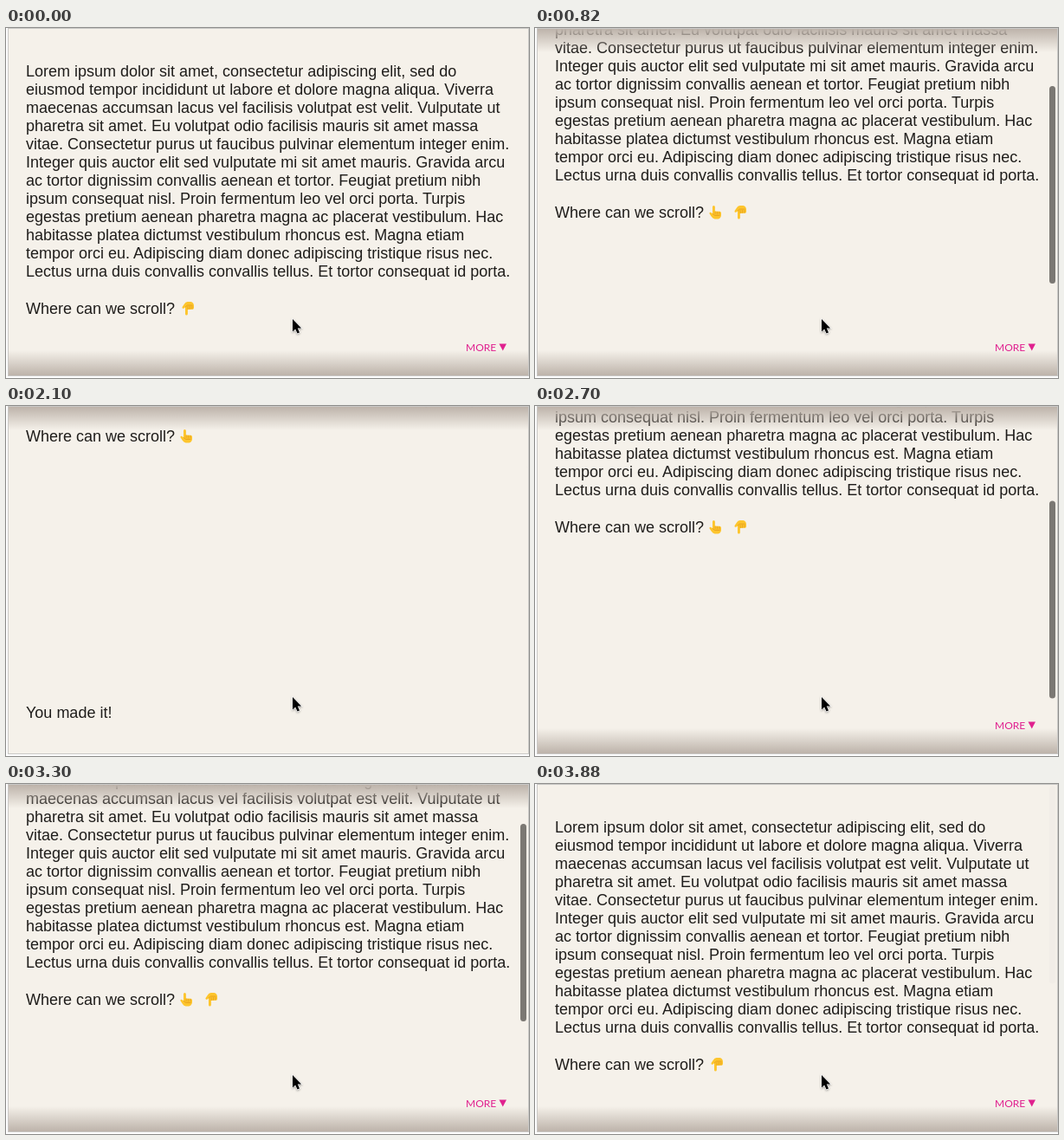
An HTML page that plays this animation: 604x404 px, repeating every 4400 ms.

```html
<!DOCTYPE html>
<html lang="en">
<head>
<meta charset="utf-8">
<title>Scroll hints</title>
<style>
html, body { margin: 0; width: 100%; height: 100%; overflow: hidden; background: #fff; }
svg { display: block; }
#content { font: 18px "Liberation Sans", Arial, sans-serif; fill: #1f1d1b; }
#more { font: 12px Lato, sans-serif; fill: #e0218f; }
</style>
</head>
<body>
<svg width="604" height="404" viewBox="0 0 604 404">
  <defs>
    <clipPath id="inner"><rect x="3" y="1" width="600" height="400"/></clipPath>
    <linearGradient id="fade" x1="0" y1="0" x2="0" y2="1">
      <stop offset="0" stop-color="#bdb3aa"/>
      <stop offset="1" stop-color="#bdb3aa" stop-opacity="0"/>
    </linearGradient>
    <g id="hand" stroke-linejoin="round">
      <path d="M4 1.6Q4 0 5.4 0T6.9 1.6V6.4L12.6 6.8Q14 7.2 14 8.6V11Q13.8 14.8 10.4 15.4H6.6Q4.2 15.2 2.8 12.8L.6 9.4Q0 8 1.3 7.7Q2.6 7.6 4 9.2Z" fill="#fdc52d"/>
      <path d="M7 6.6V10.2M9.4 7V10.4M11.8 7.2V10.4M4 9.2L6.4 11.4H12.6" fill="none" stroke="#e39a1c" stroke-width=".8"/>
    </g>
  </defs>
  <rect x="2.5" y=".5" width="601" height="401" fill="#f5f1ea" stroke="#c9c8c6"/>
  <g clip-path="url(#inner)">
    <g id="content">
      <use id="up" href="#hand" x="201" y="316"/>
      <use id="down" href="#hand"/>
    </g>
    <rect id="top" x="3" y="1" width="600" height="27" fill="url(#fade)"/>
    <g id="bottom">
      <rect x="3" y="-401" width="600" height="29" transform="scale(1 -1)" fill="url(#fade)"/>
      <g id="more"><text x="531" y="373">MORE</text><path d="M569.5 364.5H578L573.8 372.5Z"/></g>
    </g>
    <rect id="thumb" x="594" width="7" height="228" rx="3.5" fill="#7b7873"/>
  </g>
  <path d="M331 336V350.4L334.2 347.4L336.5 352.6L339 351.5L336.8 346.4H341.2Z" fill="#000" stroke="#fff" stroke-width="1.2" paint-order="stroke" style="filter:drop-shadow(0 1px 1px #0005)"/>
</svg>
<script>
const LOOP = 4400, MAX = 289;
const lines = `Lorem ipsum dolor sit amet, consectetur adipiscing elit, sed do
eiusmod tempor incididunt ut labore et dolore magna aliqua. Viverra
maecenas accumsan lacus vel facilisis volutpat est velit. Vulputate ut
pharetra sit amet. Eu volutpat odio facilisis mauris sit amet massa
vitae. Consectetur purus ut faucibus pulvinar elementum integer enim.
Integer quis auctor elit sed vulputate mi sit amet mauris. Gravida arcu
ac tortor dignissim convallis aenean et tortor. Feugiat pretium nibh
ipsum consequat nisl. Proin fermentum leo vel orci porta. Turpis
egestas pretium aenean pharetra magna ac placerat vestibulum. Hac
habitasse platea dictumst vestibulum rhoncus est. Magna etiam
tempor orci eu. Adipiscing diam donec adipiscing tristique risus nec.
Lectus urna duis convallis convallis tellus. Et tortor consequat id porta.`.split("\n");

// time, scroll offset, speed
const path = [
  [20, 0, 0], [440, 46, .17], [1260, 197, .22], [1610, MAX, .2], [1611, MAX, 0],
  [2120, MAX, 0], [2700, 184, -.19], [3300, 75, -.23], [3560, 0, -.2], [3561, 0, 0], [LOOP, 0, 0]
];

const $ = id => document.getElementById(id);
const set = (id, name, value) => $(id).setAttribute(name, value);
const ramp = (t, start, length) => Math.min(1, Math.max(0, (t - start) / length));

function addText(text, y) {
  const el = document.createElementNS("http://www.w3.org/2000/svg", "text");
  el.setAttribute("x", 23);
  el.setAttribute("y", y);
  el.textContent = text;
  $("content").append(el);
}

function scrollAt(t) {
  const i = path.findIndex(p => p[0] > t);
  if (i < 1) return 0;
  const [t0, s0, v0] = path[i - 1], [t1, s1, v1] = path[i];
  const d = t1 - t0, u = (t - t0) / d, w = 1 - u;
  return Math.round(w * w * (s0 * (1 + 2 * u) + v0 * d * u) + u * u * (s1 * (1 + 2 * w) - v1 * d * w));
}

function draw() {
  const t = Math.floor(performance.now() % LOOP / 20) * 20;
  const s = scrollAt(t), canUp = s > 0, canDown = s < MAX;
  set("content", "transform", `translate(0 ${-s})`);
  set("up", "visibility", canUp ? "visible" : "hidden");
  set("down", "visibility", canDown ? "visible" : "hidden");
  // the downward hand is the same shape flipped
  set("down", "transform", `translate(${canUp ? 230 : 203} 331.5) scale(1 -1)`);
  set("top", "opacity", ramp(t, 0, 200) - ramp(t, 3560, 200));
  set("bottom", "opacity", 1 - ramp(t, 1600, 200) + ramp(t, 2120, 200));
  set("thumb", "y", 2.2 + s * .583);
  set("thumb", "opacity", ramp(t, 0, 100) - ramp(t, 1850, 220) + ramp(t, 2120, 100) - .97 * ramp(t, 3660, 220));
  requestAnimationFrame(draw);
}

lines.forEach((line, i) => addText(line, 56 + 21 * i));
addText("Where can we scroll?", 330);
addText("You made it!", 649);
draw();
</script>
</body>
</html>
```
